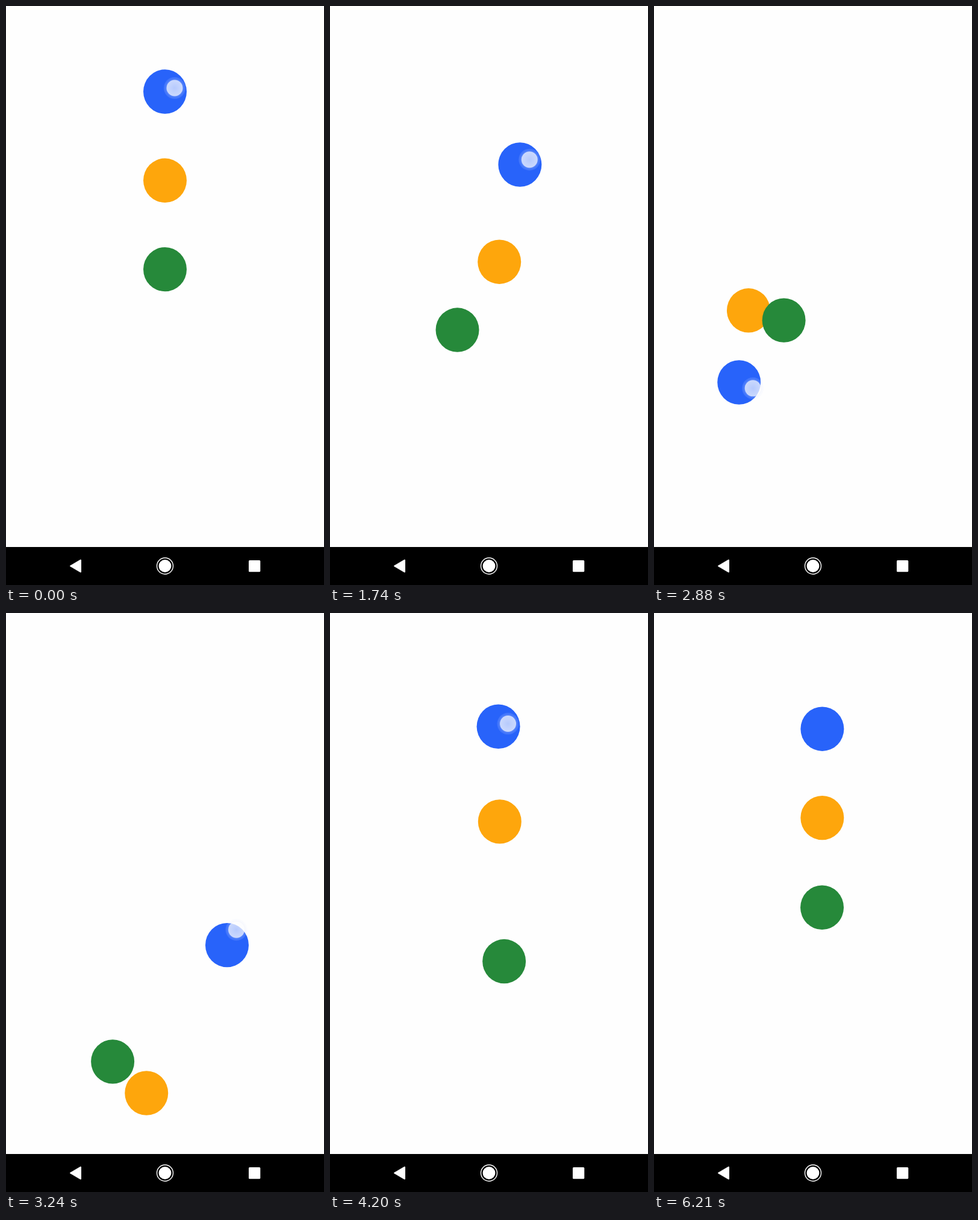
These frames come from a looping animation (528x960 px, 6.24 s). An HTML page:

```html
<!DOCTYPE html>
<html lang="en">
<head>
<meta charset="utf-8">
<title>Chained springs</title>
<style>
  html, body { margin: 0; width: 100%; height: 100%; overflow: hidden; background: #fefefe; }
  svg { display: block; width: 100%; height: 100%; }
</style>
</head>
<body>
<svg viewBox="0 0 528 960">
  <defs>
    <radialGradient id="tip">
      <stop offset="0" stop-color="#fff" stop-opacity=".58"/>
      <stop offset="1" stop-color="#fff" stop-opacity=".7"/>
    </radialGradient>
  </defs>
  <ellipse class="ball" rx="36" ry="36.7" fill="#2863fa"/>
  <ellipse class="ball" rx="36" ry="36.7" fill="#fea60c"/>
  <ellipse class="ball" rx="36" ry="36.7" fill="#26893a"/>
  <g id="touch">
    <circle r="18" fill="#dfe5fa" fill-opacity=".14"/>
    <circle r="15.5" fill="#dfe5fa" fill-opacity=".1"/>
    <circle r="13.5" fill="url(#tip)"/>
  </g>
  <rect y="897" width="528" height="63"/>
  <g fill="#fff">
    <path d="M107 928.5 L124 918.7 V938.3 Z" stroke="#fff" stroke-width="2" stroke-linejoin="round"/>
    <circle cx="264" cy="928.5" r="10.4"/>
    <circle cx="264" cy="928.5" r="13.5" fill="none" stroke="#fff" stroke-width="1.4"/>
    <rect x="403" y="919" width="19.3" height="19.3" rx="1.6"/>
  </g>
</svg>
<script>
const LOOP = 6240, STEP = 30;
const LIFT = 5550;                   // the finger leaves the screen
const LAG = 14;                      // the ball trails the finger, ms
const OMEGA = Math.sqrt(50) / 1000;  // critically damped spring, per ms
const GAP = 147.3;                   // rest distance between balls

// Turning points of the drag on each axis: [time, position]
const dragX = [
  [150, 264], [980, 119], [1540, 316], [1850, 314.5], [2810, 124], [3240, 367],
  [3560, 285], [3800, 280], [4920, 279], [5280, 276.5], [5480, 279.4]
];
const dragY = [
  [150, 142], [980, 185], [1400, 298], [1740, 263], [2170, 153], [2320, 153],
  [2640, 360], [2880, 624], [3050, 798], [3270, 512], [3500, 300], [3630, 238],
  [3880, 178], [4000, 178], [4740, 235], [5280, 192.2]
];

const rate = (a, b) => (b[1] - a[1]) / (b[0] - a[0]);

// Harmonic mean of the neighbouring rates, flat at turning points
function slope(keys, i) {
  if (i === 0 || i === keys.length - 1) return 0;
  const before = rate(keys[i - 1], keys[i]), after = rate(keys[i], keys[i + 1]);
  return before * after > 0 ? 2 * before * after / (before + after) : 0;
}

function follow(keys, t) {
  let i = 0;
  while (i < keys.length - 2 && t >= keys[i + 1][0]) i++;
  const [t0, p0] = keys[i], [t1, p1] = keys[i + 1], d = t1 - t0;
  const u = Math.min(1, Math.max(0, (t - t0) / d)), v = 1 - u;
  return v * v * (1 + 2 * u) * p0 + u * u * (1 + 2 * v) * p1
    + u * v * d * (v * slope(keys, i) - u * slope(keys, i + 1));
}

const lead = t => [follow(dragX, t), follow(dragY, t)];

// Each follower is pulled by a spring towards the ball before it
function simulate() {
  const frames = [], vel = [0, 0, 0, 0];
  const [x, y] = lead(0), pos = [x, y + GAP, x, y + 2 * GAP];
  for (let t = 0; t < LOOP; t++) {
    if (t % STEP === 0) frames.push([...pos]);
    const [leadX, leadY] = lead(t);
    const goal = [leadX, leadY + GAP, pos[0], pos[1] + GAP];
    for (let k = 0; k < 4; k++) {
      vel[k] += OMEGA * OMEGA * (goal[k] - pos[k]) - 2 * OMEGA * vel[k];
      pos[k] += vel[k];
    }
  }
  return frames;
}

const frames = simulate();
const balls = document.querySelectorAll(".ball");
const touch = document.getElementById("touch");
const place = (el, x, y) => el.setAttribute("transform", `translate(${x.toFixed(2)} ${y.toFixed(2)})`);

function draw(time) {
  const n = Math.floor(((time + 2) % LOOP) / STEP), t = n * STEP;
  const [x1, y1, x2, y2] = frames[n];
  const [fingerX, fingerY] = lead(t + LAG);
  place(balls[0], ...lead(t));
  place(balls[1], x1, y1);
  place(balls[2], x2, y2);
  place(touch, fingerX + 16, fingerY - 6);
  touch.style.display = t < LIFT ? "" : "none";
}

const start = performance.now();
function tick() {
  draw(performance.now() - start);
  requestAnimationFrame(tick);
}
tick();
</script>
</body>
</html>
```
